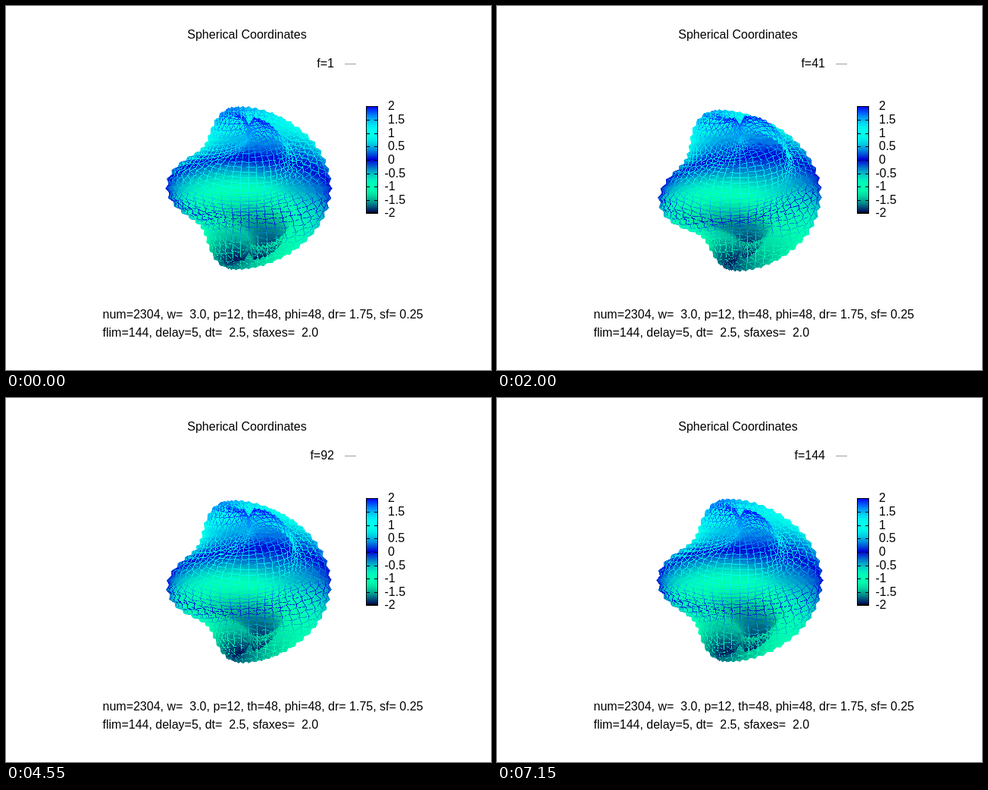
Write an HTML page with a canvas that moves like this. It is 640 px wide and 480 px high and loops after 7.2 s.

```html
<!DOCTYPE html>
<html lang="en">
<head>
<meta charset="utf-8">
<title>Spherical Coordinates</title>
<style>
  html, body { margin: 0; width: 640px; height: 480px; overflow: hidden; background: #fff; }
  canvas, svg { position: absolute; left: 0; top: 0; display: block; }
  text { font: 16px "Liberation Sans", Arial, sans-serif; fill: #000; white-space: pre; }
</style>
</head>
<body>
<canvas id="stage" width="640" height="480"></canvas>
<svg id="labels" width="640" height="480" viewBox="0 0 640 480">
  <text x="318" y="43" text-anchor="middle">Spherical Coordinates</text>
  <text id="counter" x="433" y="81" text-anchor="end">f=1</text>
  <path d="M447 76.5H462" stroke="#a0a0a0"/>
  <text x="127.5" y="412">num=2304, w=  3.0, p=12, th=48, phi=48, dr= 1.75, sf= 0.25</text>
  <text x="127.5" y="436">flim=144, delay=5, dt=  2.5, sfaxes=  2.0</text>
  <g id="scale"></g>
</svg>
<script>
const FRAMES = 144, DELAY = 50, DT = 2.5, W = 3;
const BASE = 1.75, AMP = 0.25, RIPPLE = 0.07;
const ROWS = 48, COLS = 48;
const CX = 320.5, CY = 240.5, UNIT = 54.75;
const TILT = Math.PI / 3, RAD = Math.PI / 180;
const BAR = { x: 475, y: 132, w: 16, h: 141 };

const ctx = document.getElementById('stage').getContext('2d', { willReadFrequently: true });
const counter = document.getElementById('counter');

function palette(z) {
  const g = Math.min(1, Math.max(0, (z + 2) / 4));
  return [0, Math.round(255 * Math.abs(Math.sin(2 * Math.PI * g))), Math.round(255 * Math.pow(g, 0.25))];
}
const css = z => `rgb(${palette(z)})`;

// A helical wave in latitude and azimuth; the poles rest at the base radius
// and every other grid point is slightly sunken, which roughens the outline.
function radius(row, col, lat, az, phase) {
  if (row === 0 || row === ROWS) return BASE;
  return BASE + AMP * Math.cos(4 * lat + 2 * az - phase) - RIPPLE * ((row + col) % 2);
}

// Azimuth 0 is screen left.
function vertex(row, col, phase) {
  const lat = Math.PI / 2 - row * Math.PI / ROWS;
  const az = col * 2 * Math.PI / COLS;
  const r = radius(row, col, lat, az, phase);
  const z = r * Math.sin(lat), flat = r * Math.cos(lat);
  const up = z * Math.sin(TILT) + flat * Math.sin(az) * Math.cos(TILT);
  return { x: CX - flat * Math.cos(az) * UNIT, y: CY - up * UNIT, z };
}

function fillQuad(a, b, c, d) {
  ctx.fillStyle = ctx.strokeStyle = css((a.z + b.z + c.z + d.z) / 4);
  ctx.beginPath();
  for (const p of [a, b, c, d]) ctx.lineTo(p.x, p.y);
  ctx.closePath();
  ctx.fill();
  ctx.stroke();
}

// Crisp one-pixel line written straight into the image.
function pixelLine(img, a, b) {
  const [, g, bl] = palette((a.z + b.z) / 2);
  const dx = b.x - a.x, dy = b.y - a.y;
  const steps = Math.max(1, Math.round(Math.max(Math.abs(dx), Math.abs(dy))));
  for (let i = 0; i <= steps; i++) {
    const x = Math.floor(a.x + dx * i / steps), y = Math.floor(a.y + dy * i / steps);
    const k = 4 * (y * img.width + x);
    img.data[k] = 0;
    img.data[k + 1] = g;
    img.data[k + 2] = bl;
    img.data[k + 3] = 255;
  }
}

function drawSurface(frame) {
  const phase = W * DT * frame * RAD;
  const grid = [];
  for (let i = 0; i <= ROWS; i++) {
    grid.push([]);
    for (let j = 0; j <= COLS; j++) grid[i].push(vertex(i, j, phase));
  }
  ctx.lineWidth = 0.5;
  ctx.lineJoin = 'round';
  for (let i = 0; i < ROWS; i++)
    for (let j = 0; j < COLS; j++)
      fillQuad(grid[i][j], grid[i][j + 1], grid[i + 1][j + 1], grid[i + 1][j]);

  const img = ctx.getImageData(0, 0, 640, 480);
  for (let i = 0; i <= ROWS; i++)
    for (let j = 0; j < COLS; j++) pixelLine(img, grid[i][j], grid[i][j + 1]);
  for (let j = 0; j < COLS; j++)
    for (let i = 0; i < ROWS; i++) pixelLine(img, grid[i][j], grid[i + 1][j]);
  ctx.putImageData(img, 0, 0);
}

function drawBar() {
  for (let i = 0; i < BAR.h; i++) {
    ctx.fillStyle = css(2 - 4 * i / (BAR.h - 1));
    ctx.fillRect(BAR.x, BAR.y + i, BAR.w, 1);
  }
}

function buildScale() {
  const right = BAR.x + BAR.w;
  let out = `<rect x="${BAR.x + .5}" y="${BAR.y + .5}" width="${BAR.w - 1}" height="${BAR.h}" fill="none" stroke="#000"/>`;
  for (let v = 2; v >= -2; v -= 0.5) {
    const y = Math.ceil(BAR.y + (2 - v) / 4 * BAR.h) + 0.5;
    out += `<path d="M${BAR.x} ${y}h5M${right} ${y}h-5" stroke="#000"/>` +
           `<text x="${v < 0 ? 499.5 : 504}" y="${y + 4.5}">${v}</text>`;
  }
  document.getElementById('scale').innerHTML = out;
}

let shown = 0;
function render(time) {
  const frame = Math.floor(time / DELAY) % FRAMES + 1;
  if (frame !== shown) {
    shown = frame;
    ctx.fillStyle = '#fff';
    ctx.fillRect(0, 0, 640, 480);
    drawSurface(frame);
    drawBar();
    counter.textContent = 'f=' + frame;
  }
}

buildScale();
const start = performance.now();
function tick() {
  render(performance.now() - start);
  requestAnimationFrame(tick);
}
tick();
</script>
</body>
</html>
```
